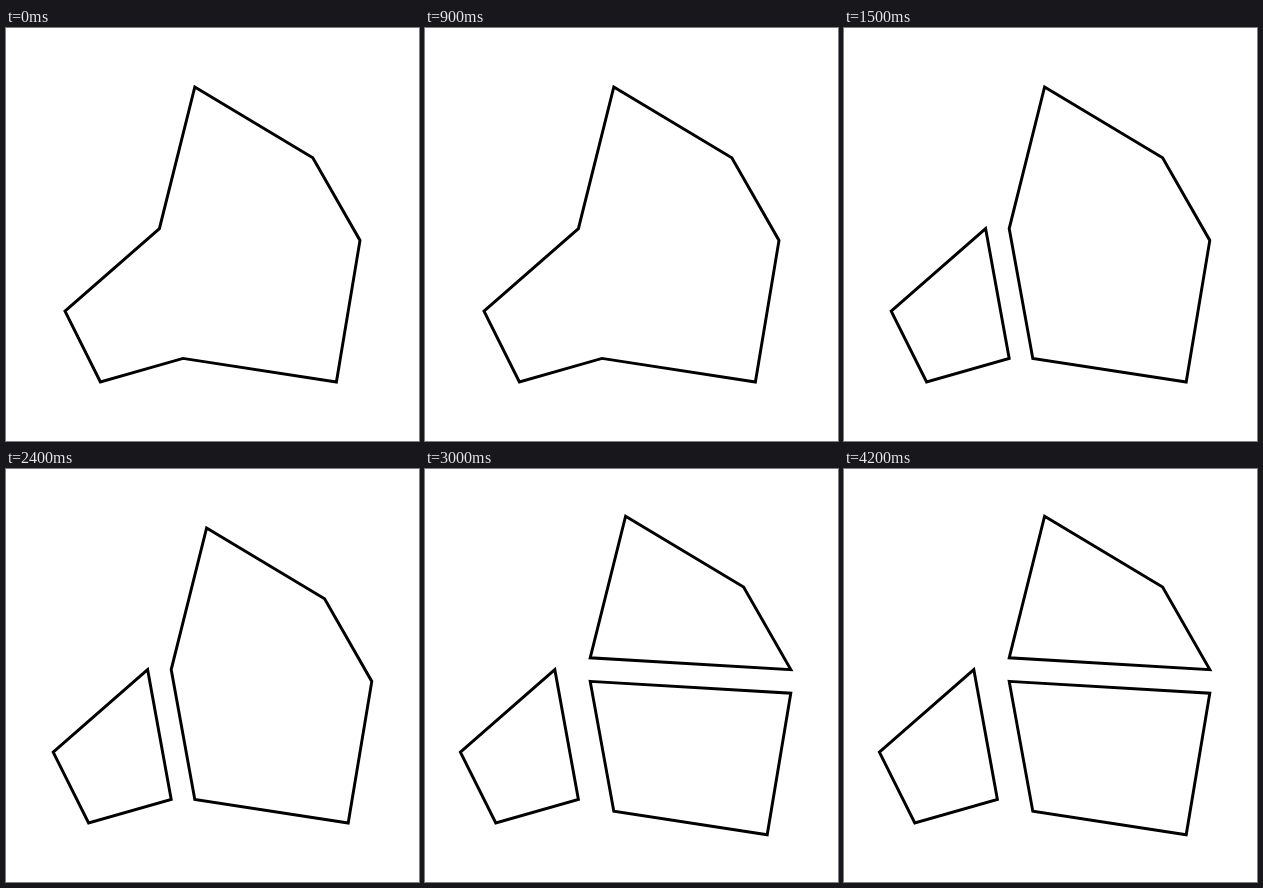
Write an HTML page with a canvas that moves like this. It is 413 px wide and 413 px high and loops after 5 s.

```html
<!DOCTYPE html>
<html lang="en">
<head>
<meta charset="utf-8">
<title>Splitting a polygon into convex parts</title>
<style>
  html, body { margin: 0; width: 100%; height: 100%; overflow: hidden; background: #fff; }
  canvas { display: block; }
</style>
</head>
<body>
<canvas id="stage" width="413" height="413"></canvas>
<script>
const ctx = document.getElementById('stage').getContext('2d');
const UNIT = 413 / 35;
const LOOP = 5000;

// Corners in grid units
const apex = [16, 5], shoulder = [26, 11], east = [30, 18], southEast = [28, 30];
const dent = [15, 28], southWest = [8, 30], west = [5, 24], notch = [13, 17];

const whole = [apex, shoulder, east, southEast, dent, southWest, west, notch];
const left = [notch, dent, southWest, west];
const right = [apex, shoulder, east, southEast, dent, notch];
const upper = [apex, shoulder, east, notch];
const lower = [notch, east, southEast, dent];

function outline(points, dx = 0, dy = 0) {
  ctx.beginPath();
  for (const [x, y] of points) ctx.lineTo((x + dx) * UNIT, (y + dy) * UNIT);
  ctx.closePath();
  ctx.stroke();
}

function draw(time) {
  ctx.fillStyle = '#fff';
  ctx.fillRect(0, 0, 413, 413);
  ctx.strokeStyle = '#000';
  ctx.lineWidth = UNIT / 4;
  ctx.lineJoin = 'miter';

  if (time < 1500) {
    outline(whole);
  } else if (time < 3000) {
    outline(left, -1);
    outline(right, 1);
  } else {
    outline(left, -2);
    outline(upper, 1, -1);
    outline(lower, 1, 1);
  }
}

const start = performance.now();
function tick() {
  draw((performance.now() - start) % LOOP);
  requestAnimationFrame(tick);
}
tick();
</script>
</body>
</html>
```
